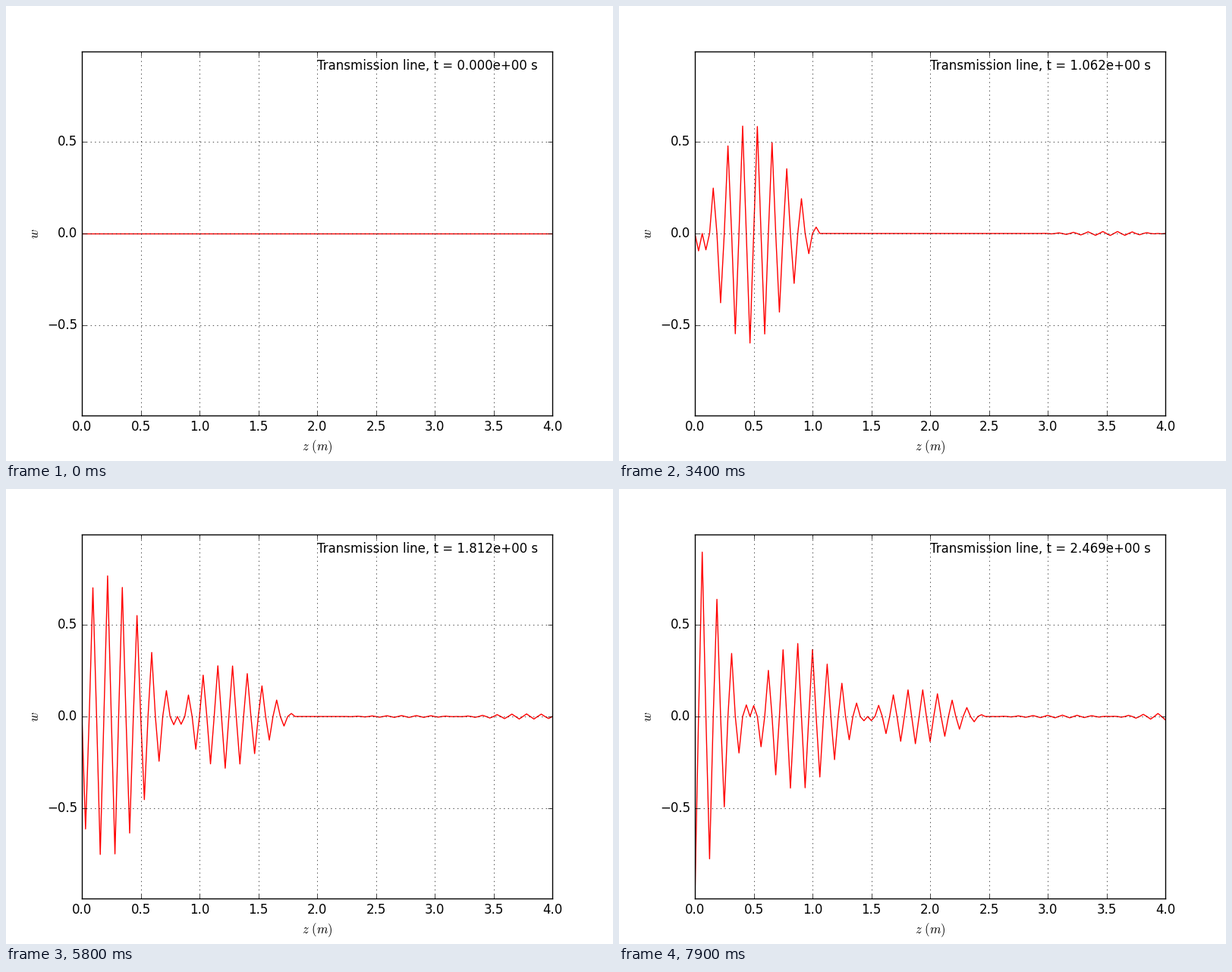
A matplotlib script for the animation above (8000 ms loop, 800 by 600 pixels).

```python
"""Damped waves driven from both ends of a distortionless transmission line."""
import numpy as np
import matplotlib.pyplot as plt
from matplotlib.animation import FuncAnimation

plt.style.use("classic")

LENGTH = 4.0
CELLS = 128
DT = LENGTH / CELLS  # unit wave speed, one cell per step
STEPS = 80
Y_MAX = np.sin(15 * np.pi / 32)

z = np.linspace(0, LENGTH, CELLS + 1)


def drive(t):
    """Beating signal fed in at the ends, silent before t = 0."""
    return np.where(t > 0, np.sin(16 * np.pi * t) * np.sin(np.pi * t), 0.0)


def wave(t):
    back = LENGTH - z
    right_going = np.exp(-z) * drive(t - z)
    left_going = np.exp(-LENGTH - back) * drive(t - back)
    return right_going + left_going


fig = plt.figure(figsize=(8, 6), dpi=100, facecolor="white")
ax = fig.add_axes([0.125, 0.1, 0.775, 0.8])
ax.set_xlim(0, LENGTH)
ax.set_ylim(-Y_MAX, Y_MAX)
ax.set_xticks(np.arange(0, 4.5, 0.5))
ax.set_yticks([-0.5, 0, 0.5])
ax.set_xlabel(r"$z\ (m)$")
ax.set_ylabel(r"$w$")
ax.grid(True)

line, = ax.plot(z, wave(0.0), "r-")
label = ax.text(0.5, 0.95, "", transform=ax.transAxes)


def update(step):
    t = step * DT
    line.set_ydata(wave(t))
    label.set_text(f"Transmission line, t = {t:.3e} s")
    return line, label


anim = FuncAnimation(fig, update, frames=STEPS, interval=100,
                     repeat=True, repeat_delay=0, blit=False)
plt.show()
```
